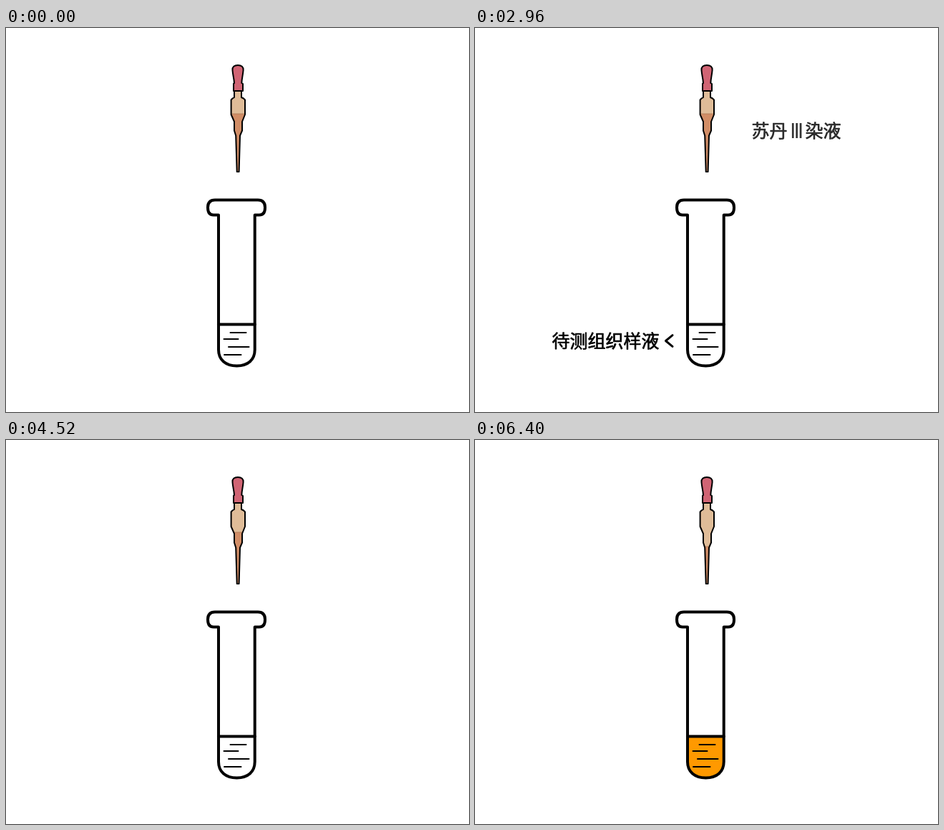
An HTML page with a canvas that plays this animation: 647x537 px, repeating every 7320 ms.

```html
<!DOCTYPE html>
<html lang="zh-CN">
<head>
<meta charset="utf-8">
<style>
html, body { margin: 0; width: 100%; height: 100%; overflow: hidden; background: #fff; }
canvas { display: block; }
</style>
</head>
<body>
<canvas id="stage" width="647" height="537"></canvas>
<script>
const ctx = document.getElementById('stage').getContext('2d');
const LOOP = 7320, STEP = 40;
const FONT = '25px "Noto Sans CJK SC", "Noto Sans CJK", sans-serif';
const DROPS = [3880, 4720, 5560];
const LEVELS = [120, 129, 139, 149];
const TINTS = [0, 0.25, 0.5, 1];
const TINT_STEPS = [2, 2, 5];

const clamp = v => Math.max(0, Math.min(1, v));
const mix = (a, b, p) => a + (b - a) * p;

const TUBE = new Path2D('M297 261.5H290C284 261.5 282 257 282 251C282 244 285 240.5 292 240.5H352' +
  'C359 240.5 362 244 362 251C362 257 360 261.5 354 261.5H347.7V450C347.7 464 338 472.5 322.5 472.5' +
  'C307 472.5 297 464 297 450Z');
const GLASS = new Path2D('M319 88V97L316.5 98.5L314.6 100.5V121L319 131V143.5L321.2 150.5L322.7 201' +
  'H325.6L327 150.5L330 143.5V131L334 121V100.5L332 98.5L329 97V88Z');
const DROP = new Path2D('M0 0C1 5 3.3 9 3.3 13C3.3 16.5 2 18 0 18C-2 18 -3.3 16.5 -3.3 13C-3.3 9 -1 5 0 0Z');
const DASHES = [[313.5, 426, 335.5], [304.5, 435, 324.5], [311, 446, 339.5], [305, 457, 328.5]];

function line(points, width) {
  ctx.lineWidth = width;
  ctx.beginPath();
  points.forEach(([x, y]) => ctx.lineTo(x, y));
  ctx.stroke();
}

function write(str, x, y) {
  ctx.font = FONT;
  ctx.lineWidth = 0.7;
  ctx.fillText(str, x, y);
  ctx.strokeText(str, x, y);
}

function stainLabel() {
  write('苏丹', 364.5, 153);
  for (let i = 0; i < 3; i++) ctx.fillRect(420.9 + i * 5.4, 133, 2.7, 21);
  write('染液', 439.5, 153);
}

const LABELS = [
  { dir: 1, tip: 354.5, y: 143.5, arrowAt: 80, textAt: 640, outAt: 2960, speed: 22, draw: stainLabel },
  { dir: -1, tip: 266.5, y: 437.5, arrowAt: 920, textAt: 1600, outAt: 3360, speed: 20,
    draw: () => write('待测组织样液', 107.5, 447) }
];

function drawLabel(l, t) {
  const out = t < l.outAt ? 0 : (t - l.outAt) / STEP + 1;
  ctx.save();
  ctx.fillStyle = ctx.strokeStyle = '#000';
  if (t >= l.arrowAt && !out) {
    // slides out two pixels too far, then settles
    const k = (t - l.arrowAt) / STEP;
    const x = l.tip + l.dir * (k < 5 ? -22 + 6 * k : 0);
    ctx.globalAlpha = clamp((k + 1) / 5);
    line([[x - l.dir * 9.5, l.y - 7.8], [x, l.y], [x - l.dir * 9.5, l.y + 7.8]], 3);
  }
  if (t >= l.textAt && out < 5) {
    const p = clamp(((t - l.textAt) / STEP + 1) / 4);
    ctx.globalAlpha = p * (1 - out / 5);
    ctx.translate(l.dir * (out * l.speed - 36 * (1 - p)), 0);
    l.draw();
  }
  ctx.restore();
}

function drawTube(tint, dropY, dropSize) {
  ctx.fillStyle = '#fff';
  ctx.fill(TUBE);
  if (dropSize) {
    ctx.save();
    ctx.translate(324, dropY);
    ctx.scale(dropSize, dropSize);
    ctx.fillStyle = '#cc2229';
    ctx.fill(DROP);
    ctx.restore();
  }
  ctx.save();
  ctx.clip(TUBE);
  ctx.fillStyle = `rgb(255,${Math.round(255 - 102 * tint)},${Math.round(255 - 255 * tint)})`;
  ctx.fillRect(297, 414.5, 52, 60);
  ctx.restore();
  ctx.strokeStyle = '#000';
  ctx.lineWidth = 4;
  ctx.stroke(TUBE);
  line([[297, 414.5], [347.7, 414.5]], 4);
  DASHES.forEach(([a, y, b]) => line([[a, y], [b, y]], 2));
}

function drawDropper(level, squeeze) {
  ctx.fillStyle = '#dfbc98';
  ctx.fill(GLASS);
  ctx.save();
  ctx.clip(GLASS);
  ctx.fillStyle = '#d18d66';
  ctx.fillRect(310, level, 30, 210 - level);
  ctx.fillStyle = '#b98460';
  ctx.fillRect(310, level - 0.5, 30, 1.2);
  ctx.restore();
  ctx.strokeStyle = '#000';
  ctx.lineWidth = 2;
  ctx.stroke(GLASS);

  const s = 3.5 * squeeze;
  ctx.beginPath();
  ctx.moveTo(316.5, 59);
  ctx.bezierCurveTo(316, 54.5, 319, 52, 324, 52);
  ctx.bezierCurveTo(329, 52, 332, 54.5, 331.6, 59);
  ctx.bezierCurveTo(331 - s, 66, 329.5 - s, 71, 329.3, 77);
  ctx.lineTo(331, 78);
  ctx.lineTo(331, 88);
  ctx.lineTo(318, 88);
  ctx.lineTo(318, 78);
  ctx.lineTo(319, 77);
  ctx.bezierCurveTo(318.7 + s, 71, 317 + s, 66, 316.5, 59);
  ctx.closePath();
  ctx.fillStyle = '#d06474';
  ctx.fill();
  ctx.stroke();
}

function render(now) {
  const t = Math.floor((now % LOOP) / STEP) * STEP;
  let level = LEVELS[0], tint = 0, squeeze = 0, dropY = 202, dropSize = 0;
  DROPS.forEach((start, i) => {
    if (t < start) return;
    const k = (t - start) / STEP;
    level = mix(LEVELS[i], LEVELS[i + 1], clamp((k + 1) / 5));
    tint = mix(TINTS[i], TINTS[i + 1], clamp((k - 16) / TINT_STEPS[i]));
    squeeze = Math.sin(Math.PI * clamp((k + 1) / 6));
    dropSize = k < 2 || k > 15 ? 0 : clamp((k - 1) / 3);
    dropY = 202 + 18 * Math.max(0, k - 4);
  });

  ctx.fillStyle = '#fff';
  ctx.fillRect(0, 0, 647, 537);
  ctx.lineCap = ctx.lineJoin = 'round';
  LABELS.forEach(l => drawLabel(l, t));
  drawTube(tint, dropY, dropSize);
  drawDropper(level, squeeze);
}

const begin = performance.now();
function tick() {
  render(performance.now() - begin);
  requestAnimationFrame(tick);
}
tick();
</script>
</body>
</html>
```
